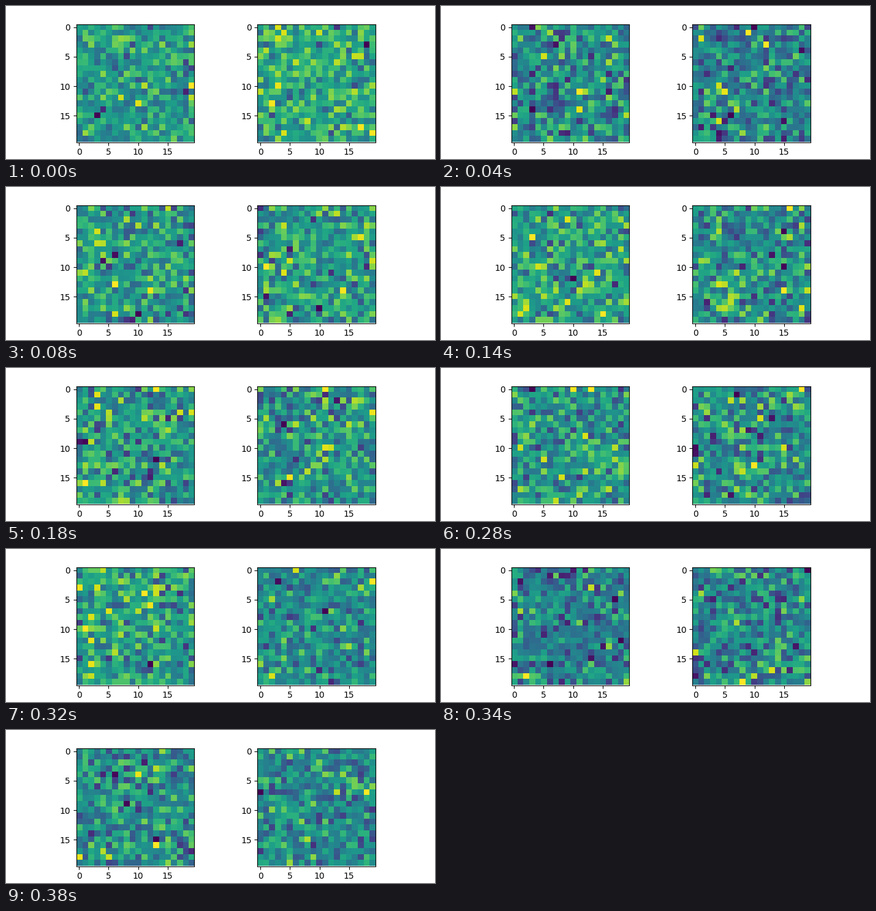
Write a matplotlib script that moves like this. It is 700 px wide and 250 px high and loops after 400 ms.

```python
import numpy as np
import matplotlib.pyplot as plt
from matplotlib.animation import FuncAnimation

SIZE = 20
FRAMES = 20
INTERVAL = 20  # ms


def noise(step):
    """Two fresh fields of normal noise, the same for a given step."""
    rng = np.random.default_rng(step)
    return rng.standard_normal((2, SIZE, SIZE))


fig, axes = plt.subplots(1, 2, figsize=(7, 2.5), dpi=100)
images = []
for ax, field in zip(axes, noise(0)):
    images.append(ax.imshow(field, cmap="viridis", interpolation="nearest"))
    ax.set_xticks(range(0, SIZE, 5))
    ax.set_yticks(range(0, SIZE, 5))


def update(step):
    for image, field in zip(images, noise(step)):
        image.set_data(field)
        image.autoscale()  # each field spans the whole colour map
    return images


anim = FuncAnimation(fig, update, frames=FRAMES, interval=INTERVAL,
                     repeat=True, repeat_delay=0)
plt.show()
```
